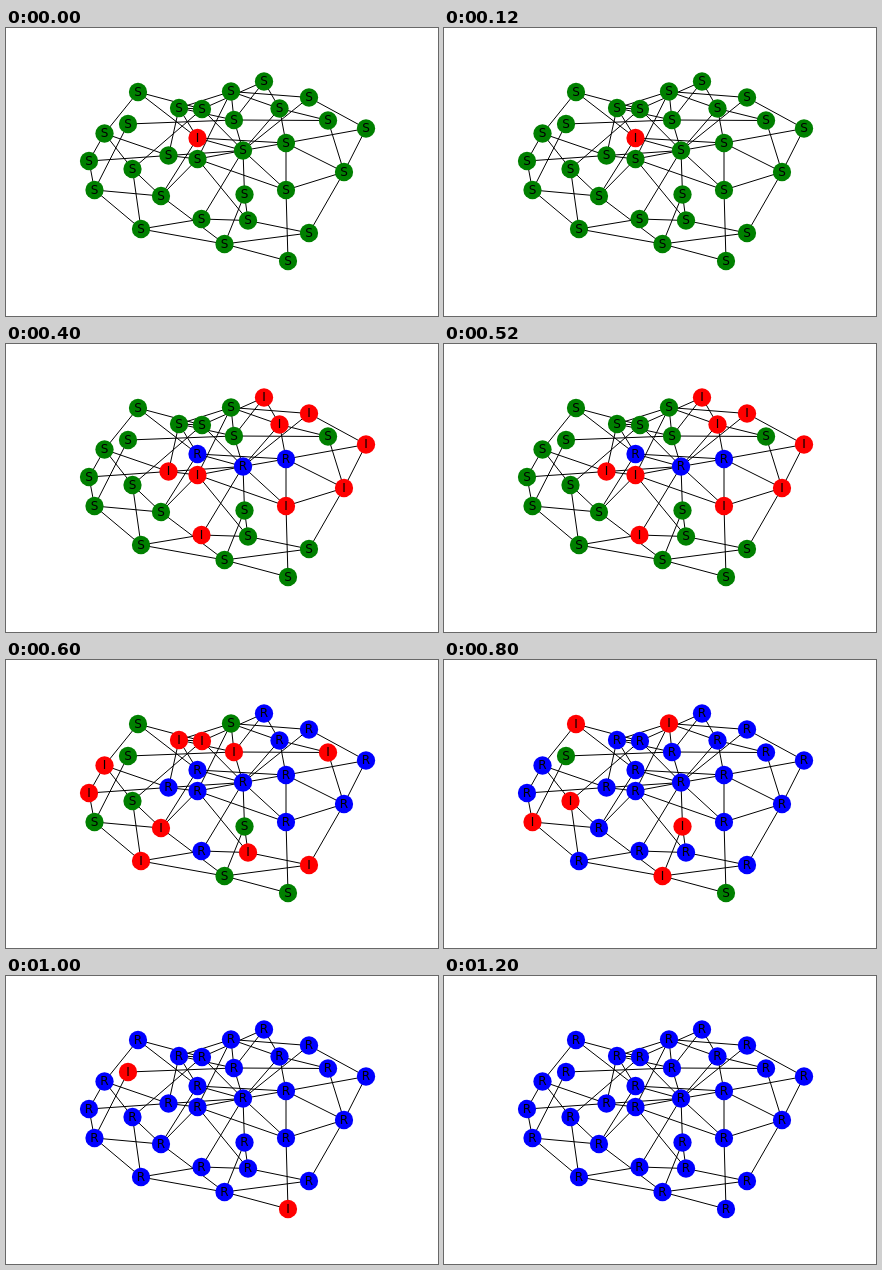
Recreate the animation shown at these times as an HTML page. Size 432 px wide and 288 px high, loop 1.4 s.

```html
<!DOCTYPE html>
<html lang="en">
<head>
<meta charset="utf-8">
<title>Epidemic on a network</title>
<style>
  html, body { margin: 0; width: 100%; height: 100%; overflow: hidden; background: #fff; }
  svg { display: block; width: 100vw; height: 100vh; }
  line { stroke: #000; stroke-width: 1; }
  text { font: 12px "DejaVu Sans", sans-serif; text-anchor: middle; fill: #000; }
</style>
</head>
<body>
<svg id="stage" viewBox="0 0 432 288"></svg>
<script>
const STEP = 200, STEPS = 7;

// id: x, y, step at which the node is infected
const nodes = {
  A: [132, 64, 4], B: [173, 80, 3], C: [196, 81, 3], D: [225, 63.5, 4], E: [258, 53.5, 2],
  F: [303, 69.5, 2], G: [273.5, 80.5, 2], H: [228, 92, 3], I: [322, 92.5, 3], J: [360, 100.5, 2],
  K: [122, 96, 5], L: [98.5, 105.5, 3], M: [191.5, 110, 0], N: [237, 122.5, 1], O: [280, 115, 1],
  P: [162.5, 127.5, 2], Q: [191.5, 131, 2], R: [83, 133, 3], S: [126.5, 141, 4], T: [88.5, 162, 4],
  U: [155, 168, 3], V: [238.5, 166.5, 4], W: [280, 162, 2], X: [338, 144, 2], Y: [135, 201, 3],
  Z: [195.5, 191, 2], a: [242, 192.5, 3], b: [218.5, 216, 4], c: [303, 205, 3], d: [282, 233, 5]
};

const edges = ("AC AM AL BC BD BH BM BP CE CN CS DF DG DH DQ EH EG FJ FN GI GN GO " +
  "HI HK HN IX JO JX KT LP LR LS MN MO MU NO NP NQ NV NW NZ OW OX PQ PR QU QW Qa " +
  "RT SU SY TU TY Ub Va Vb WX Wd Xc YZ Yb Za ac bc bd").split(" ");

const states = {
  S: "#008000",
  I: "#ff0000",
  R: "#0000ff"
};

const stage = document.getElementById("stage");

function add(tag, attrs) {
  const el = document.createElementNS("http://www.w3.org/2000/svg", tag);
  for (const key in attrs) el.setAttribute(key, attrs[key]);
  return stage.appendChild(el);
}

for (const [from, to] of edges) {
  const [x1, y1] = nodes[from], [x2, y2] = nodes[to];
  add("line", { x1, y1, x2, y2 });
}

const discs = Object.values(nodes).map(([x, y, infected]) => ({
  infected,
  circle: add("circle", { cx: x, cy: y, r: 9.15 })
}));

// Labels sit above every disc
Object.values(nodes).forEach(([x, y], i) => {
  discs[i].label = add("text", { x, y: Math.round(y + 3.6) });
});

let shown = -1;

function draw(time) {
  const step = Math.floor(time / STEP) % STEPS;
  if (step === shown) return;
  shown = step;
  for (const { infected, circle, label } of discs) {
    const state = step < infected ? "S" : step === infected ? "I" : "R";
    circle.setAttribute("fill", states[state]);
    label.textContent = state;
  }
}

const start = performance.now();

function tick() {
  draw(performance.now() - start);
  requestAnimationFrame(tick);
}

tick();
</script>
</body>
</html>
```
